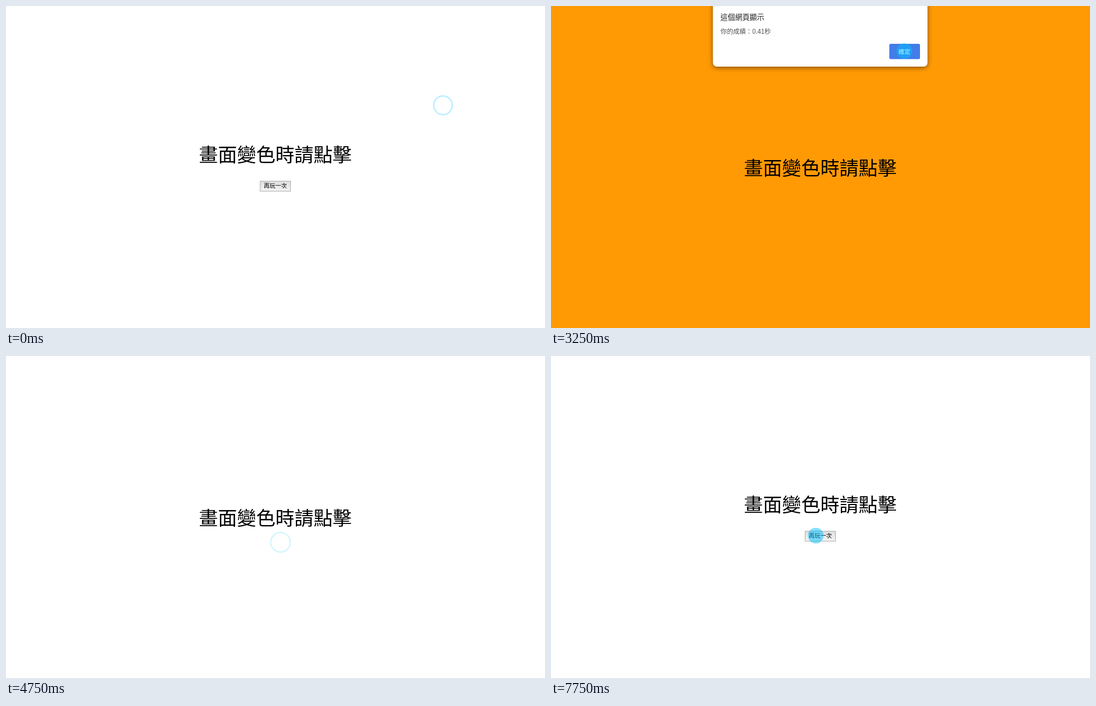
Recreate the animation shown at these times as an HTML page. Size 967 px wide and 579 px high, loop 8000 ms.

```html
<!DOCTYPE html>
<html lang="zh-Hant">
<head>
<meta charset="utf-8">
<style>
  html, body { margin: 0; width: 100%; height: 100%; overflow: hidden; background: #fff; }
  svg { display: block; width: 967px; height: 579px; font-family: "Noto Sans CJK TC", "Noto Sans CJK", sans-serif; }
  .center { text-anchor: middle; }
  #dialog > rect:first-child { filter: drop-shadow(0 2px 4px rgba(0, 0, 0, .5)); }
</style>
</head>
<body>
<svg viewBox="0 0 967 579">
  <defs>
    <linearGradient id="silver" x2="0" y2="1">
      <stop stop-color="#dedede"/><stop offset="1" stop-color="#f4f4f4"/>
    </linearGradient>
  </defs>
  <rect id="page" width="967" height="579"/>
  <text id="heading" class="center" x="483.2" font-size="34.3">畫面變色時請點擊</text>
  <g id="again">
    <rect id="face" x="456" y="315" width="54.5" height="18" stroke-width="1"/>
    <text class="center" x="483.2" y="327.4" font-size="10.4">再玩一次</text>
  </g>
  <g id="dialog">
    <rect x="290.5" y="-12" width="385" height="121" rx="7" fill="#fff"/>
    <text x="304" y="25" font-size="13.1" font-weight="500" fill="#202124">這個網頁顯示</text>
    <text id="message" x="304" y="49.8" font-size="11.4" font-weight="500" fill="#505357"></text>
    <rect x="607" y="68" width="55" height="27.5" rx="2.5" fill="#427ce8"/>
    <text class="center" x="634" y="85.5" font-size="10.7" font-weight="700" fill="#fff">確定</text>
  </g>
  <circle id="pointer"/>
</svg>
<script>
const LOOP = 8000, STEP = 250;
const el = id => document.getElementById(id);
const set = (id, attrs) => {
  for (const name in attrs) el(id).setAttribute(name, attrs[name]);
};
const show = (id, visible) => set(id, { visibility: visible ? 'visible' : 'hidden' });
const within = (t, ...spans) => spans.some(([from, to]) => t >= from && t < to);

const BLUE = '#00bfff';
const looks = {
  press: { r: 14, fill: BLUE, stroke: 'none', opacity: .5 },
  release: { r: 16.7, fill: 'none', stroke: BLUE, 'stroke-width': 2.5, opacity: .27 },
  fade: { r: 17.6, fill: 'none', stroke: BLUE, 'stroke-width': 2.5, opacity: .17 }
};

// Start time, end time, look, x, y of each pointer highlight.
const marks = [
  [0, 250, 'release', 784, 178.5],
  [250, 500, 'fade', 784, 171],
  [1500, 2000, 'press', 459, 331],
  [2000, 2500, 'release', 459, 331],
  [2500, 2750, 'press', 612, 344],
  [2750, 3000, 'release', 612, 344],
  [3250, 3500, 'press', 634, 81],
  [3500, 3750, 'release', 634, 84],
  [4250, 4500, 'press', 488, 326],
  [4500, 4750, 'release', 492.5, 335],
  [4750, 5000, 'fade', 492.5, 335],
  [5250, 5500, 'press', 560, 350],
  [5500, 5750, 'release', 560, 350],
  [5750, 6000, 'fade', 560, 350],
  [6500, 6750, 'press', 635, 84],
  [6750, 7000, 'release', 637, 98],
  [7000, 7250, 'fade', 637, 98],
  [7750, 8000, 'press', 475, 323]
];

function draw(now) {
  const t = Math.floor(now % LOOP / STEP) * STEP;
  const orange = within(t, [2000, 4750]);
  const idle = within(t, [0, 1750], [4000, 4750], [7250, LOOP]);

  set('page', { fill: orange ? '#ff9a05' : '#fff' });
  set('heading', { y: idle ? 280 : 304 });
  set('face', {
    fill: orange ? '#acb5b5' : 'url(#silver)',
    stroke: orange ? '#b5b09c' : '#a8a8a8'
  });
  show('again', idle);

  show('dialog', within(t, [2750, 3750], [5500, 7000]));
  el('message').textContent = t < 5000 ? '你的成績：0.41秒' : '還沒變色喔，失敗！';

  const mark = marks.find(([from, to]) => within(t, [from, to]));
  show('pointer', mark);
  if (mark) {
    const [, , look, cx, cy] = mark;
    set('pointer', { ...looks[look], cx, cy });
  }
}

const start = performance.now();
function tick() {
  draw(performance.now() - start);
  requestAnimationFrame(tick);
}
tick();
</script>
</body>
</html>
```
